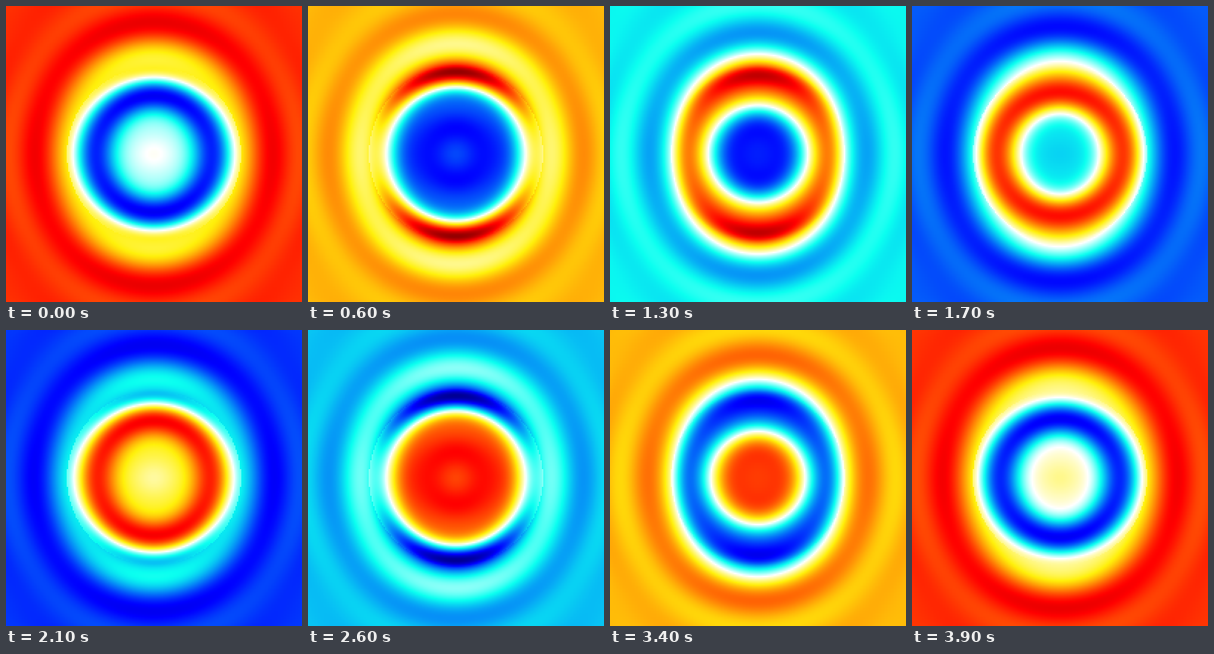
Recreate the animation shown at these times as an HTML page with a canvas. Size 400 by 400 pixels, loop 4000 ms.

```html
<!DOCTYPE html>
<html lang="en">
<head>
<meta charset="utf-8">
<title>Plane wave on a water droplet</title>
<style>
  html, body { margin: 0; width: 100%; height: 100%; overflow: hidden; background: #fff; }
  canvas { display: block; width: 400px; height: 400px; image-rendering: pixelated; }
</style>
</head>
<body>
<canvas id="stage" width="200" height="200"></canvas>
<script>
// Mie solution in the plane through the sphere centre, across the wave direction
const SIZE = 200, HALF = SIZE / 2;
const EXTENT = 1.7;      // half width of the view, in sphere radii
const X = 14.8;          // size parameter
const M = 1.33;          // refractive index
const ORDERS = 30;
const PEAK = 1.5;        // field value at the end of the colour scale
const PERIOD = 4000, STEP = 100;

// Riccati-Bessel functions, by downward recurrence
function psi(rho) {
  const f = [];
  f[71] = 0;
  f[70] = 1;
  for (let n = 70; n > 0; n--) f[n - 1] = (2 * n + 1) / rho * f[n] - f[n + 1];
  const f0 = Math.sin(rho), f1 = f0 / rho - Math.cos(rho);
  const scale = Math.abs(f0) > Math.abs(f1) ? f0 / f[0] : f1 / f[1];
  return f.slice(0, ORDERS + 1).map(v => v * scale);
}

function eta(rho) {
  const f = [-Math.cos(rho), -Math.cos(rho) / rho - Math.sin(rho)];
  for (let n = 1; n < ORDERS; n++) f[n + 1] = (2 * n + 1) / rho * f[n] - f[n - 1];
  return f;
}

const slope = (f, rho) => f.map((v, n) => n ? f[n - 1] - n * v / rho : 0);

// Scattered and inner amplitude of each order as [re, im];
// only electric terms of odd order and magnetic terms of even order reach this plane
function amplitudes() {
  const y = M * X;
  const px = psi(X), py = psi(y), ex = eta(X);
  const dpx = slope(px, X), dpy = slope(py, y), dex = slope(ex, X);
  const list = [];
  let angular = 1;
  for (let n = 1; n <= ORDERS; n++) {
    const odd = n % 2 === 1;
    if (odd && n > 1) angular *= n / (n - 1);
    const u = odd ? M : 1, v = odd ? 1 : M;
    const A = u * py[n] * dpx[n] - v * px[n] * dpy[n];
    const B = u * py[n] * dex[n] - v * ex[n] * dpy[n];
    const norm = A * A + B * B;
    const weight = (2 * n + 1) / (n * (n + 1)) * angular * (odd ? 1 : n + 1);
    list[n] = {
      odd, weight,
      outer: [-A * A / norm, A * B / norm],
      inner: [M * B / norm, M * A / norm]
    };
  }
  return list;
}

const orders = amplitudes();

// Complex field along the polarisation, r in sphere radii
function field(r, cos2) {
  const inside = r < 1;
  const rho = X * r * (inside ? M : 1);
  const p = psi(rho), dp = slope(p, rho);
  const e = inside ? p.map(() => 0) : eta(rho);
  const de = inside ? e : slope(e, rho);
  let re = inside ? 0 : 1, im = 0;
  for (let n = 1; n <= ORDERS; n++) {
    const o = orders[n];
    const [a, b] = inside ? o.inner : o.outer;
    const mix = (f, df) => o.weight * (o.odd
      ? cos2 * n * (n + 1) * f[n] / (rho * rho) + (1 - cos2) * df[n] / rho
      : (1 - cos2) * f[n] / rho);
    const c = mix(p, dp), s = mix(e, de);
    re += a * c - b * s;
    im += a * s + b * c;
  }
  return [re, im];
}

// One quadrant is enough, the others mirror it
const quad = [];
for (let j = 0; j < HALF; j++) {
  for (let i = 0; i < HALF; i++) {
    const x = (i + 0.5) / HALF * EXTENT, y = (j + 0.5) / HALF * EXTENT;
    const r2 = x * x + y * y;
    quad.push(field(Math.sqrt(r2), x * x / r2));
  }
}

// Colour stops: [position, r, g, b]
const WARM = [[0, 255, 255, 255], [0.28, 255, 240, 10], [0.75, 255, 0, 0], [1, 128, 0, 0]];
const COOL = [[0, 255, 255, 255], [0.28, 10, 255, 240], [0.75, 0, 0, 255], [1, 0, 0, 128]];

function shade(value) {
  const stops = value < 0 ? COOL : WARM;
  const v = Math.min(1, Math.abs(value) / PEAK);
  const k = stops.findIndex((s, i) => i > 0 && v <= s[0]);
  const from = stops[k - 1], to = stops[k];
  const mix = (v - from[0]) / (to[0] - from[0]);
  return [1, 2, 3].map(i => from[i] + (to[i] - from[i]) * mix);
}

const ctx = document.getElementById("stage").getContext("2d");
const image = ctx.createImageData(SIZE, SIZE);
const fold = i => i < HALF ? HALF - 1 - i : i - HALF;

function draw(time) {
  const phase = 2 * Math.PI * time / PERIOD;
  const c = Math.cos(phase), s = Math.sin(phase);
  const colors = quad.map(([re, im]) => shade(re * c + im * s));
  let k = 0;
  for (let j = 0; j < SIZE; j++) {
    for (let i = 0; i < SIZE; i++) {
      const [r, g, b] = colors[fold(j) * HALF + fold(i)];
      image.data[k++] = r;
      image.data[k++] = g;
      image.data[k++] = b;
      image.data[k++] = 255;
    }
  }
  ctx.putImageData(image, 0, 0);
}

const start = performance.now();
let shown = -1;
function tick() {
  const time = Math.max(0, performance.now() - start) % PERIOD;
  const step = Math.floor(time / STEP);
  if (step !== shown) {
    shown = step;
    draw(step * STEP);
  }
  requestAnimationFrame(tick);
}
tick();
</script>
</body>
</html>
```
